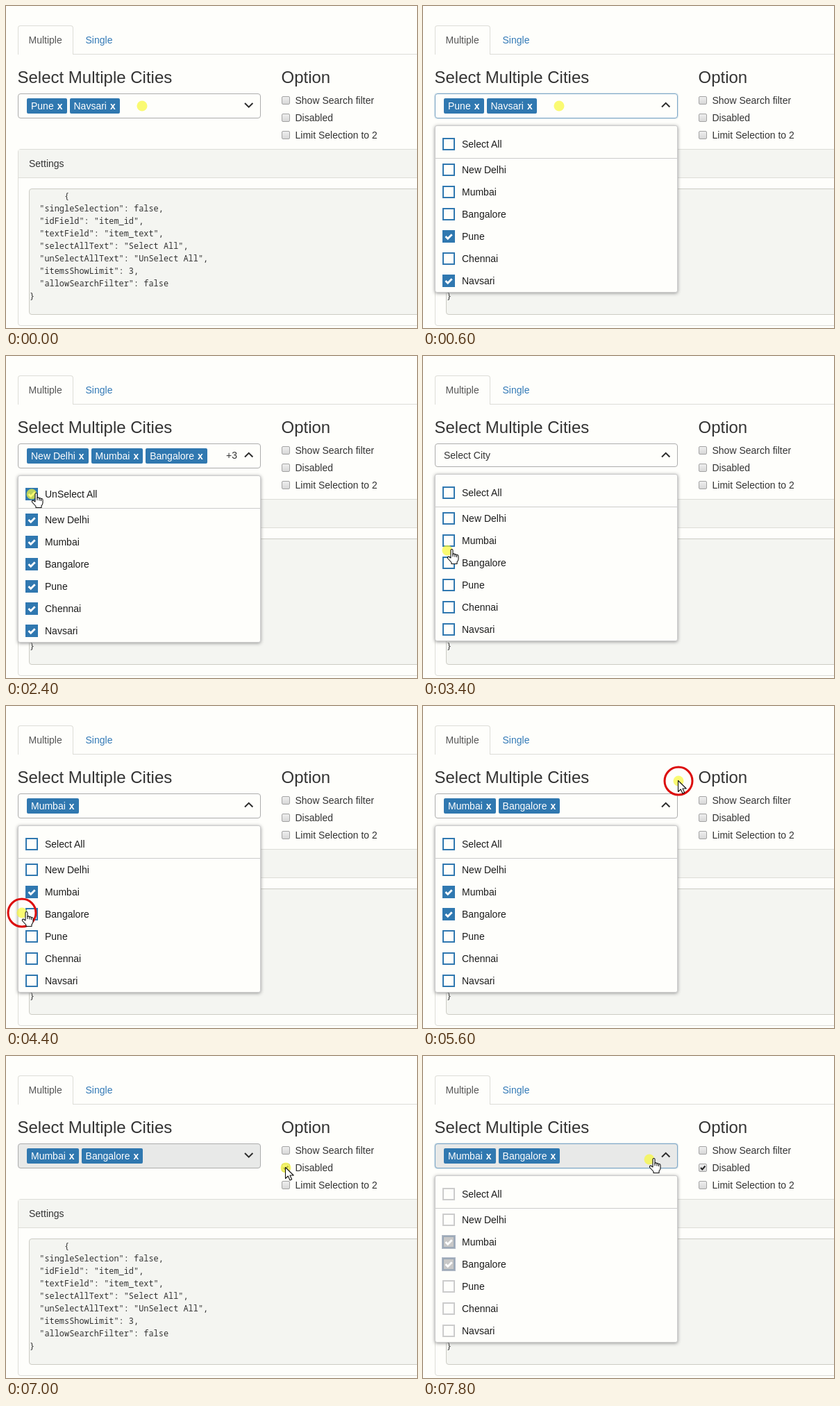
Recreate the animation shown at these times as an HTML page. Size 592x464 px, loop 8 s.

```html
<!DOCTYPE html>
<html lang="en">
<head>
<meta charset="utf-8">
<title>Multi-select dropdown</title>
<style>
  :root { --page: #fefefb; --panel: #f4f5f1; --line: #ddddd8; --blue: #3078b0; --ink: #333; }
  * { box-sizing: border-box; }
  html, body { margin: 0; width: 100%; height: 100%; overflow: hidden; background: var(--page); }
  body { position: relative; font: 14px/20px "Liberation Sans", Arial, sans-serif; color: var(--ink); }
  body > *, #list > *, #select > * { position: absolute; white-space: pre; }
  h3 { margin: 0; font-size: 24px; line-height: 26px; font-weight: 400; top: 90px; }
  .rule { height: 1px; background: var(--line); }

  .tab { left: 17px; top: 28px; width: 80px; height: 42px; padding: 10px 14.5px;
    border: 1px solid var(--line); border-bottom: 0; border-radius: 4px 4px 0 0;
    background: var(--page); color: #555; }
  .link { left: 114.5px; top: 39px; color: #337ab7; }

  .panel { left: 17px; top: 206px; width: 600px; height: 255px; border: 1px solid var(--line); border-radius: 4px; }
  .panel div { height: 41px; padding: 10px 15px; background: var(--panel); border-bottom: 1px solid var(--line); }
  pre { margin: 0; left: 33px; top: 263px; width: 600px; height: 182px; border: 1px solid #ccccc4;
    border-radius: 4px; background: var(--panel); font: 11.91px/18px "Noto Sans Mono", monospace; }

  .option { left: 397px; padding-left: 19.5px; }
  .option svg { position: absolute; left: 0; top: 4px; width: 12px; height: 12px;
    border: 1px solid #a3a3a3; border-radius: 2px; background: linear-gradient(#eee, #d8d8d8); }
  .option path { fill: none; stroke: #262626; stroke-width: 2; visibility: hidden; }

  #select { left: 17px; top: 126px; width: 350px; height: 36px; border: 1px solid #adadad; border-radius: 4px; }
  #select.off { background: #e8e9e8; }
  #select.focus { border-color: #7ba6c6; box-shadow: 0 0 2px #8fb0c8; }
  #tags { left: 12px; top: 6px; display: flex; gap: 4px; }
  #tags span { height: 22px; line-height: 22px; padding: 0 6px; border-radius: 2px; background: var(--blue); color: #fff; }
  #tags b { margin-left: 5px; }
  #hint { left: 12px; top: 6px; }
  #more { left: 299px; top: 6px; }
  #arrow { left: 325px; top: 10px; fill: none; stroke: #2c2c2c; stroke-width: 2; }

  #list { left: 17px; top: 172px; width: 350px; height: 241px; background: var(--page);
    border: 1px solid #ccc; border-radius: 3px; box-shadow: 0 1px 5px #959595; color: #1c1c1c; }
  #list .rule { left: 0; top: 46px; width: 348px; background: #ccc; }
  .row { left: 10px; height: 20px; padding-left: 28px; }
  .row svg { position: absolute; left: 0; top: 1px; width: 18px; height: 18px; border: 2px solid var(--blue); }
  .row path { fill: none; stroke: #fff; stroke-width: 2.8; visibility: hidden; }
  .on path { visibility: visible; }
  .row.on svg { background: var(--blue); }
  .off .row svg { border-color: #ccc; }
  .off .row.on svg { background: #c8c8c8; border-color: #9ca9b8; outline: 1px solid #b4bcc8; }

  #pointer { left: 0; top: 0; overflow: visible; width: 1px; height: 1px; }
  #pointer .shape { fill: #fff; stroke: #111; stroke-width: 1.1; stroke-linejoin: round; }
</style>
</head>
<body>
  <div class="rule" style="left:17px;top:69px;right:0"></div>
  <div class="tab">Multiple</div>
  <div class="link">Single</div>
  <h3 style="left:16.5px">Select Multiple Cities</h3>
  <h3 style="left:396.5px">Option</h3>

  <div class="panel"><div>Settings</div></div>
  <pre id="settings"></pre>

  <div id="select">
    <div id="tags"></div>
    <div id="hint">Select City</div>
    <div id="more">+3</div>
    <svg id="arrow" width="14" height="14"><path/></svg>
  </div>
  <div id="list"><div class="rule"></div></div>

  <svg id="pointer">
    <circle r="7.500" fill="#f8f838" fill-opacity=".7"/>
    <circle id="ring" r="20" fill="none" stroke="#dc0c0c" stroke-width="3"/>
    <path id="plain" class="shape" d="M-.5-.5V15.500L3.300 12 6 18 8.700 16.800 6 11H11.200Z"/>
    <g id="hand" class="shape" transform="translate(-.5 -2)">
      <path d="M5.500 13V2Q5.500.500 7 .500T8.500 2V7.500Q10 6 11.500 8 13 7 14 8.700 16.500 8 16.500 11V15Q16 17.500 14.500 19V21.500H6.500V19.500L1 13.500Q.500 11 2.500 11Z"/>
      <path d="M8.500 7V11M11.500 8V11.500M14 9V12"/>
    </g>
  </svg>

<script>
const LOOP = 8000, STEP = 200;
const CITIES = ['New Delhi', 'Mumbai', 'Bangalore', 'Pune', 'Chennai', 'Navsari'];
const $ = id => document.getElementById(id);

$('settings').textContent = '       ' + JSON.stringify({
  singleSelection: false, idField: 'item_id', textField: 'item_text',
  selectAllText: 'Select All', unSelectAllText: 'UnSelect All',
  itemsShowLimit: 3, allowSearchFilter: false
}, null, 2);

function addCheck(parent, className, top, text, mark) {
  const el = document.createElement('div');
  el.className = className;
  el.style.top = top + 'px';
  el.innerHTML = `<svg><path d="${mark}"/></svg><span>${text}</span>`;
  parent.append(el);
  return el;
}

const options = ['Show Search filter', 'Disabled', 'Limit Selection to 2'].map((text, i) =>
  addCheck(document.body, 'option', 126 + 25 * i, text, 'M2 5L4.300 7.500 8.500 2.500'));
const addRow = (text, top) => addCheck($('list'), 'row', top, text, 'M2.500 7L5.700 10.200 11.700 4.200');
const allRow = addRow('Select All', 16);
const rows = CITIES.map((city, i) => addRow(city, 53 + 32 * i));
document.body.append($('list'), $('pointer'));

// Pointer stops: time, x, y
const STOPS = [
  [0, 196, 144], [600, 196, 144], [1400, 37, 199], [2600, 37, 199], [3400, 35, 280], [3600, 35, 280],
  [4400, 23, 298], [4600, 23, 298], [5600, 368, 108], [6600, 403, 161], [7200, 403, 161],
  [7600, 326, 149], [LOOP, 326, 149]
];
const CLICKS = [400, 1600, 2600, 3600, 4400, 5600, 6600, 7600];

function pointerAt(t) {
  const i = STOPS.findIndex(stop => stop[0] > t);
  const [t0, x0, y0] = STOPS[i - 1], [t1, x1, y1] = STOPS[i];
  const p = (t - t0) / (t1 - t0), k = p * p * (3 - 2 * p);
  return [x0 + (x1 - x0) * k, y0 + (y1 - y0) * k];
}

function pickedAt(t) {
  if (t < 1800) return ['Pune', 'Navsari'];
  if (t < 2800) return CITIES;
  if (t < 3800) return [];
  return t < 4600 ? ['Mumbai'] : ['Mumbai', 'Bangalore'];
}

const show = (el, visible) => { el.style.visibility = visible ? 'visible' : 'hidden'; };

function render(t) {
  const picked = pickedAt(t), empty = !picked.length, all = picked.length === CITIES.length;
  const open = t >= 600 && t < 5800 || t >= 7800;
  const focus = t >= 600 && t < 1800 || t >= 7800;
  const off = t >= 6800;

  $('select').className = (off ? 'off ' : '') + (focus ? 'focus' : '');
  $('select').style.height = (empty ? 34 : 36) + 'px';
  $('tags').innerHTML = picked.slice(0, 3).map(city => `<span>${city}<b>x</b></span>`).join('');
  show($('hint'), empty);
  show($('more'), all);
  $('arrow').firstChild.setAttribute('d', open ? 'M1 8.500L6.700 2.800 12.400 8.500' : 'M1 3L6.700 8.700 12.400 3');

  $('list').style.display = open ? 'block' : 'none';
  $('list').style.top = (empty ? 170 : 172) + 'px';
  $('list').className = off ? 'off' : '';
  allRow.classList.toggle('on', all);
  allRow.lastChild.textContent = all ? 'UnSelect All' : 'Select All';
  rows.forEach((row, i) => row.classList.toggle('on', picked.includes(CITIES[i])));
  options[1].classList.toggle('on', off);

  const [x, y] = pointerAt(t);
  const overBox = x < 367 && y > 126 && y < 162;
  const overList = open && x < 367 && y > 172 && y < 413;
  $('pointer').style.transform = `translate(${x}px, ${y}px)`;
  show($('ring'), CLICKS.includes(t));
  // Inside the box only the caret side has a visible cursor
  show($('hand'), overList || overBox && x > 310);
  show($('plain'), !overList && !overBox);
}

let shown = -1;
const start = performance.now();
function tick() {
  const t = Math.floor((performance.now() - start) % LOOP / STEP) * STEP;
  if (t !== shown) render(shown = t);
  requestAnimationFrame(tick);
}
tick();
</script>
</body>
</html>
```
